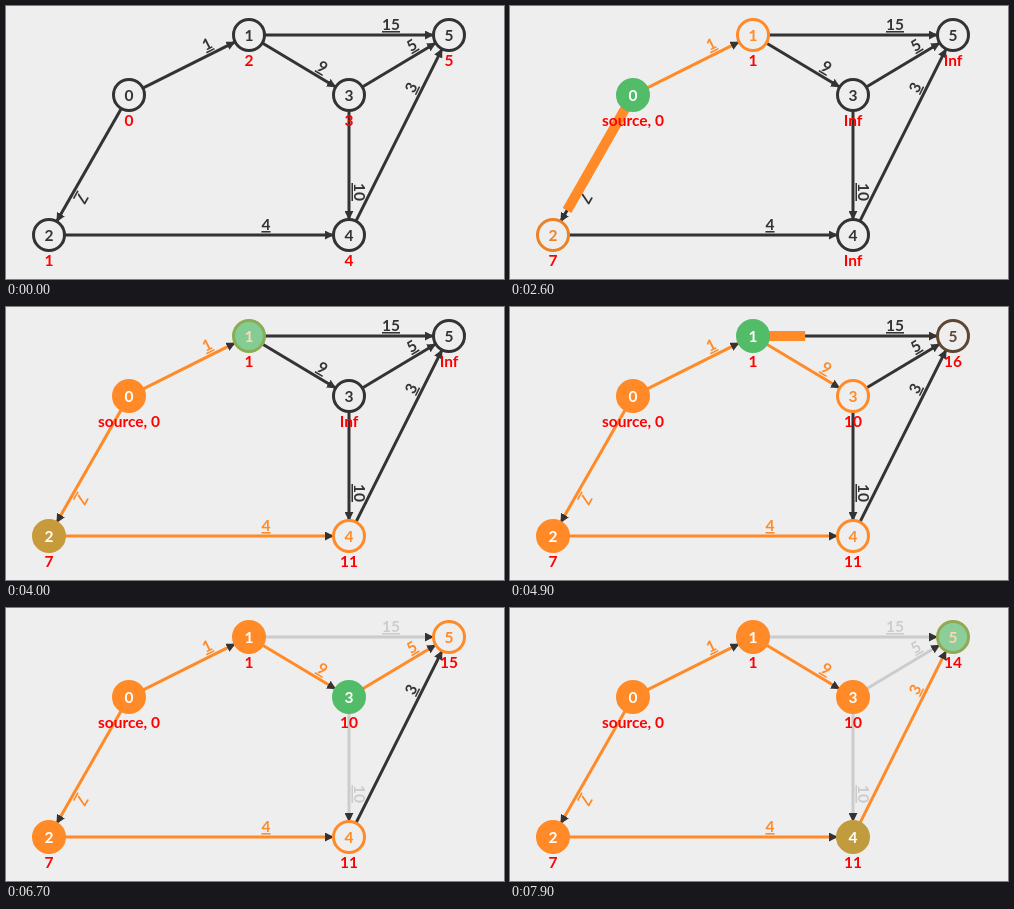
These frames come from a looping animation (498x273 px, 8 s). An HTML page:

```html
<!DOCTYPE html>
<html lang="en">
<head>
<meta charset="utf-8">
<title>Shortest paths on a DAG</title>
<style>
  html, body { margin: 0; width: 100%; height: 100%; overflow: hidden; background: #eee; }
  svg { display: block; }
  text { font: bold 15.5px Lato, "Open Sans", sans-serif; text-anchor: middle; }
  .edge { fill: none; stroke-width: 3; }
  .weight { text-decoration: underline; }
  .bar { stroke: #ff8a27; stroke-width: 10; }
  .node { stroke-width: 3; }
  .label { fill: #f00; }
</style>
</head>
<body>
<svg id="stage" width="498" height="273" viewBox="0 0 498 273">
  <defs>
    <marker id="arrow" viewBox="0 -5 10 10" refX="9" markerWidth="3" markerHeight="3" orient="auto">
      <path d="M0,-5L10,0L0,5" fill="#333"/>
    </marker>
  </defs>
</svg>
<script>
const LOOP = 8000, TICK = 100, FADE = 400, RADIUS = 16, RESET = 857;
const PAPER = [238, 238, 238], INK = [51, 51, 51], ORANGE = [255, 138, 39],
      GREEN = [82, 188, 105], GREY = [204, 204, 204], WHITE = [255, 255, 255];

// Node looks: fill, ring, number
const LOOKS = {
  plain: [PAPER, INK, INK],
  reached: [PAPER, ORANGE, ORANGE],
  active: [GREEN, GREEN, WHITE],
  done: [ORANGE, ORANGE, WHITE]
};

const points = [[123, 89], [243, 29], [43, 229], [343, 89], [343, 229], [443, 29]];
const weights = { '0-1': 1, '0-2': 7, '1-3': 9, '1-5': 15, '2-4': 4, '3-4': 10, '3-5': 5, '4-5': 3 };
const firstLabels = [0, 2, 1, 3, 4, 5];

// walk: edge being traversed; tint: its colour afterwards; drop: edge that fades to grey
const steps = [
  { at: 1343, looks: { 0: 'active' } },
  { at: 1829, walk: '0-1', looks: { 1: 'reached' }, labels: { 1: 1 } },
  { at: 2315, walk: '0-2', looks: { 2: 'reached' }, labels: { 2: 7 } },
  { at: 2801, looks: { 0: 'done', 2: 'active' } },
  { at: 3287, walk: '2-4', looks: { 4: 'reached' }, labels: { 4: 11 } },
  { at: 3773, looks: { 2: 'done', 1: 'active' } },
  { at: 4259, walk: '1-3', looks: { 3: 'reached' }, labels: { 3: 10 } },
  { at: 4749, walk: '1-5', looks: { 5: 'reached' }, labels: { 5: 16 } },
  { at: 5231, looks: { 1: 'done', 3: 'active' } },
  { at: 5718, walk: '3-4', tint: GREY },
  { at: 6203, walk: '3-5', drop: '1-5', labels: { 5: 15 } },
  { at: 6690, looks: { 3: 'done', 4: 'active' } },
  { at: 7180, walk: '4-5', drop: '3-5', labels: { 5: 14 } },
  { at: 7680, looks: { 4: 'done', 5: 'active' } }
];

const stage = document.getElementById('stage');

function add(tag, attrs, text) {
  const el = document.createElementNS('http://www.w3.org/2000/svg', tag);
  set(el, attrs);
  if (text !== undefined) el.textContent = text;
  return stage.appendChild(el);
}
function set(el, attrs) {
  for (const key in attrs) el.setAttribute(key, attrs[key]);
}
const rgb = c => `rgb(${c.map(Math.round)})`;
const mix = (a, b, k) => a.map((v, i) => v + (b[i] - v) * k);
const ease = u => u < 0.5 ? 4 * u ** 3 : 1 - 4 * (1 - u) ** 3;

const edges = {};
for (const key in weights) {
  const [[x1, y1], [x2, y2]] = key.split('-').map(i => points[i]);
  const size = Math.hypot(x2 - x1, y2 - y1);
  const dx = (x2 - x1) / size * RADIUS, dy = (y2 - y1) / size * RADIUS;
  const from = [x1 + dx, y1 + dy], to = [x2 - dx, y2 - dy];
  const line = add('path', {
    id: 'e' + key, class: 'edge', d: `M${from}L${to}`, 'marker-end': 'url(#arrow)'
  });
  edges[key] = { from, to, line };
}
for (const key in weights) {
  const weight = add('text', { class: 'weight', dy: -5 });
  const along = add('textPath', { href: '#e' + key, startOffset: '75%' }, weights[key]);
  weight.appendChild(along);
  edges[key].weight = weight;
}
const bar = add('line', { class: 'bar' });
const nodes = points.map(([x, y], i) => ({
  disc: add('circle', { class: 'node', cx: x, cy: y, r: 15.5 }),
  number: add('text', { x, y: y + 5.5 }, i),
  label: add('text', { class: 'label', x, y: y + 31 })
}));

function draw(t) {
  const looks = points.map(() => LOOKS.plain);
  const labels = t < RESET ? [...firstLabels] : points.map((p, i) => i ? 'Inf' : 'source, 0');
  const tints = {};
  for (const key in edges) tints[key] = INK;
  bar.style.display = 'none';

  for (const { at, walk, tint = ORANGE, drop, looks: next = {}, labels: texts = {} } of steps) {
    if (t < at) break;
    const u = Math.min(1, (t - at) / FADE), k = ease(u);
    for (const i in next) looks[i] = looks[i].map((c, j) => mix(c, LOOKS[next[i]][j], k));
    Object.assign(labels, texts);
    if (drop) tints[drop] = mix(tints[drop], GREY, k);
    if (walk && u === 1) tints[walk] = tint;
    else if (walk) {
      const { from, to } = edges[walk], [x2, y2] = mix(from, to, k);
      set(bar, { x1: from[0], y1: from[1], x2, y2 });
      bar.style.display = '';
    }
  }

  for (const key in edges) {
    edges[key].line.setAttribute('stroke', rgb(tints[key]));
    edges[key].weight.setAttribute('fill', rgb(tints[key]));
  }
  nodes.forEach(({ disc, number, label }, i) => {
    const [fill, ring, ink] = looks[i].map(rgb);
    set(disc, { fill, stroke: ring });
    number.setAttribute('fill', ink);
    label.textContent = labels[i];
  });
}

function frame() {
  const t = performance.now() % LOOP;
  draw(Math.floor(t / TICK) * TICK);
  requestAnimationFrame(frame);
}
frame();
</script>
</body>
</html>
```
